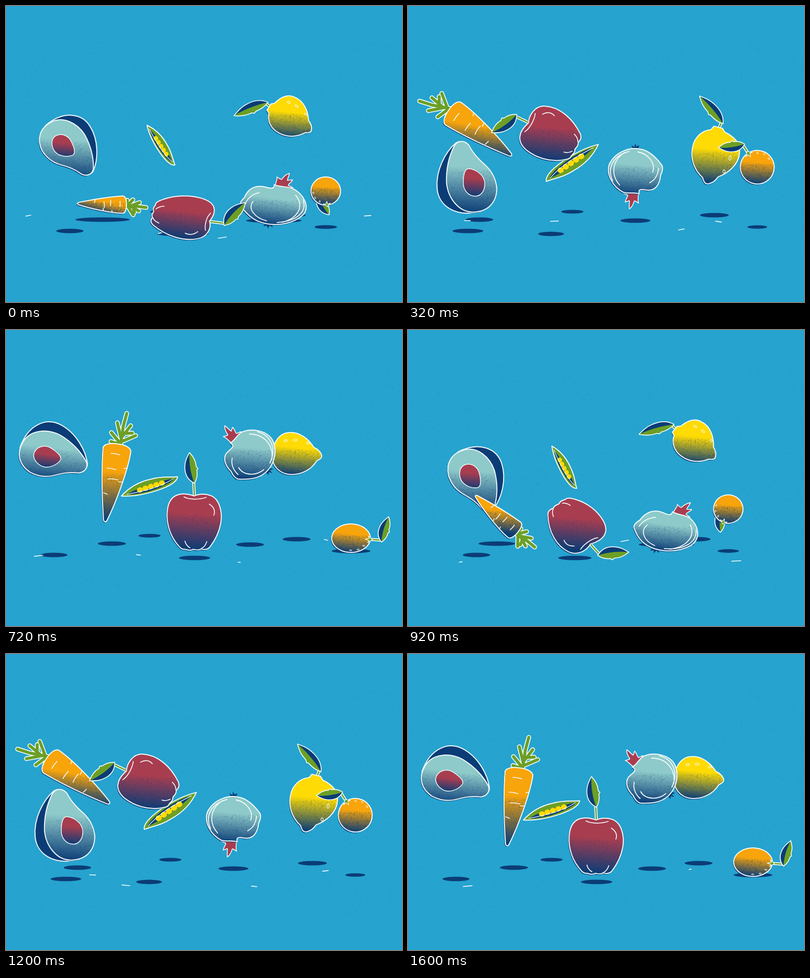
Write an HTML page with a canvas that moves like this. It is 800 by 600 pixels and loops after 1640 ms.

```html
<!DOCTYPE html>
<html lang="en">
<head>
<meta charset="utf-8">
<title>Bouncing produce</title>
<style>
html, body { margin: 0; width: 100%; height: 100%; overflow: hidden; background: #26a3cf; }
canvas { display: block; width: 800px; height: 600px; }
</style>
</head>
<body>
<canvas id="stage" width="800" height="600"></canvas>
<script>
const ctx = document.getElementById('stage').getContext('2d');
const LOOP = 1640, STEP = 40, CYCLE = 880, TIMES = [0, 200, 480, 720];
const NAVY = '#0b3c76', WHITE = '#f4fbfb', GREEN = '#6c9f25', RED = '#a93d50',
      TEAL = '#8ecaca', YELLOW = '#fedb04', ORANGE = '#f8a40b', BLUE = '#26a3cf';

function random(seed) {
  return () => (seed = (seed * 16807) % 2147483647) / 2147483647;
}

const oval = (x, y, a, b) => `M${x - a} ${y}a${a} ${b} 0 1 1 ${2 * a} 0a${a} ${b} 0 1 1 ${-2 * a} 0Z`;

function peas() {
  let d = '';
  for (let i = 0; i < 5; i++) d += oval(334 + i * 13, 407 - i * 2.2, 7, 6);
  return d;
}

const POD = 'M290 415C310 398 335 388 362 386C388 382 405 388 424 389C421 401 402 408 377 413C345 419 315 420 290 415Z';
const LEAF = 'M-5 1C6 -14 20 -16 34 -13C46 -11 54 -4 62 2C50 10 38 12 30 11L25 14L22 11C12 11 3 8 -5 1Z';
const LEAF_LOW = 'M-5 1C12 -3 38 -4 62 2C50 10 38 12 30 11L25 14L22 11C12 11 3 8 -5 1Z';

// keys: x, y, angle, size, bend at each of TIMES; hit: the key on the ground.
const items = [
  { // pea pod
    at: [357, 402], ground: 417, shadow: 43, hit: 2,
    keys: [[313, 282, 66, .72], [320, 284, 72, .88], [357, 402, 360], [290, 317, 352, .88]],
    parts: [
      { d: POD, fill: GREEN },
      { d: 'M303 413C327 403 345 402 365 398C388 393 403 392 416 392C405 402 382 408 354 413C334 415 316 416 303 413Z', fill: NAVY },
      { d: peas(), fill: YELLOW },
      { d: POD, line: 2 },
      { d: 'M303 413C335 411 375 410 414 392', line: 1.3 }
    ]
  },
  { // lemon
    at: [587, 251], half: [48, 43], ground: 424, shadow: 56, soft: .17, hit: 2,
    keys: [[577, 227, 29, .93], [622, 262, 60, 1.1], [580, 391, 180, 1.04], [587, 251, 360]],
    stem: { from: [538, 253], joint: [521, 250], turn: -230, size: 1.1, flip: -.75 },
    parts: [
      { d: 'M637 252C640 259 634 262 628 265C618 281 600 293 578 293C556 293 543 280 539 266L532 262L533 246L539 241C545 220 556 209 571 208C593 205 612 222 622 238C629 241 634 245 637 252Z', fill: YELLOW, lit: true, line: 2 },
      { d: oval(565, 224, 3.5, 2) + oval(584, 223, 4, 2) + oval(610, 229, 3, 2), line: 1.1 }
    ]
  },
  { // onion
    at: [493, 253], half: [50, 50], ground: 435, shadow: 56, soft: .18, hit: 0,
    keys: [[541, 402, 60, 1.04], [470, 394, 140], [468, 252, 343], [493, 253, 360]],
    parts: [
      { d: 'M518 282C526 279 533 279 540 282L533 284L538 290L531 288L530 294L526 289L522 293Z', fill: NAVY },
      { d: 'M455 228C448 224 446 218 439 216C446 214 448 214 448 212C444 206 441 200 442 194C448 198 452 204 455 205L458 197C464 204 462 208 466 210L474 206C475 214 474 222 466 226Z', fill: RED, line: 1.6 },
      { d: 'M453 229C462 225 466 213 476 207C498 198 528 204 539 224C550 250 540 282 514 296C498 304 480 303 468 302C461 299 458 294 455 287C440 272 437 256 450 245C459 238 462 234 453 229Z', fill: TEAL, lit: true, line: 2 },
      { d: 'M492 211C523 211 541 235 537 262M508 206C536 214 547 240 533 270M470 279C480 296 505 296 521 283M457 260C454 274 461 286 469 293', line: 1.8 }
    ]
  },
  { // avocado
    at: [79, 296], half: [69, 48], ground: 456, shadow: 54, hit: 1,
    keys: [[129, 288, 58, .95], [181, 397, 152, 1.12], [79, 296, 360], [97, 254, 388]],
    parts: [
      { d: 'M11 315C3 264 30 235 62 235C98 235 132 258 147 280C152 290 147 300 120 302Z', fill: NAVY, line: 2 },
      { d: 'M11 300C13 272 42 254 72 254C104 256 128 267 143 277C152 285 150 297 140 304C122 311 110 321 97 333C84 344 68 349 52 349C25 346 9 328 11 300Z', fill: TEAL, lit: true, line: 2 },
      { d: 'M41 308C42 292 56 285 68 286C82 287 96 291 95 299C93 312 80 328 64 327C50 326 41 318 41 308Z', fill: RED, lit: true, box: [68, 306, 27, 20], line: 1.5 }
    ]
  },
  { // carrot
    at: [214, 308], half: [27, 78], ground: 433, shadow: 55, hit: 0,
    keys: [[195, 402, 82, .62], [142, 291, 247, .95, -27], [170, 245, 328, .94, -10], [214, 308, 360]],
    parts: [
      { d: 'M231 236L237 195L244 169M231 230L213 208M233 222L225 188M235 216L252 194M234 226L262 214M231 232L212 226M238 210L255 209', tube: 6, hinge: [230, 234] },
      { d: 'M196 238C199 230 213 229 226 231C238 232 254 238 252 248C246 285 222 350 205 384C202 391 198 390 197 384C194 340 192 290 196 238Z', fill: ORANGE, lit: true, line: 2 },
      { d: 'M212 250Q221 250 230 253M204 280Q213 280 222 283M238 281L245 280M206 302Q216 301 226 304M227 308L235 308M197 330L205 333', line: 1.6 }
    ]
  },
  { // apple
    at: [381, 388], half: [53, 58], ground: 462, shadow: 52, soft: .12, hit: 0,
    keys: [[357, 428, 102, .93], [288, 300, 264, .97], [320, 260, 312, .97, -5], [381, 388, 360, 1, 50]],
    stem: { from: [381, 340], joint: [379, 304], turn: -150, size: .94, flip: 1 },
    parts: [
      { d: 'M380 335C395 328 418 330 427 348C440 375 433 410 412 440C406 448 398 447 394 445C388 450 382 446 378 446C371 451 366 446 362 446C355 447 351 441 345 433C330 412 324 385 328 360C333 333 352 325 380 335Z', fill: RED, lit: true, line: 2 },
      { d: 'M360 337C370 343 391 343 404 338M410 352C419 358 422 366 419 375M362 429Q364 438 372 443M395 444Q402 440 405 430', line: 1.7 }
    ]
  },
  { // orange
    at: [0, 0], half: [34, 34], ground: 448, shadow: 39, soft: .15, hit: 3,
    keys: [[646, 375, 85, .86, -125], [687, 322, 215, .97], [718, 359, 252, 1.02], [697, 422, 365]],
    stem: { from: [31, 0], joint: [54, 0], turn: -80, size: .8, flip: 1 },
    parts: [
      { d: oval(0, 0, 34, 34), fill: ORANGE, lit: true, line: 2 },
      { d: oval(15, 26, 2, 1.4) + oval(2, 29, 2, 1.4) + oval(24, 16, 2, 1.4), line: 1 },
      { d: 'M38 0L30 -8L32 -2L25 0L32 3L30 8Z', fill: GREEN, line: 1.2 }
    ]
  }
];

const cache = new Map();
function place(d, m) {
  if (!cache.has(d)) cache.set(d, new Path2D(d));
  const p = new Path2D();
  p.addPath(cache.get(d), m);
  return p;
}

// Smooth curve through uneven keys, with free ends.
function curve(t, v, x) {
  const last = t.length - 1;
  const h = i => t[i + 1] - t[i], d = i => (v[i + 1] - v[i]) / h(i);
  const slope = i => {
    if (i === 0) return d(0) + (d(0) - d(1)) * h(0) / (h(0) + h(1));
    if (i === last) return d(i - 1) + (d(i - 1) - d(i - 2)) * h(i - 1) / (h(i - 1) + h(i - 2));
    return (d(i - 1) * h(i) + d(i) * h(i - 1)) / (h(i - 1) + h(i));
  };
  let i = 0;
  while (i < last - 1 && x >= t[i + 1]) i++;
  const u = (x - t[i]) / h(i), w = 1 - u;
  return v[i] * w * w * (1 + 2 * u) + v[i + 1] * u * u * (3 - 2 * u)
    + h(i) * u * w * (slope(i) * w - slope(i + 1) * u);
}

// From one hit to the next: a flight with one full turn.
function pose(item, phase) {
  const times = [], keys = [];
  for (let i = item.hit; i <= item.hit + TIMES.length; i++) {
    const lap = Math.floor(i / TIMES.length), j = i % TIMES.length;
    const [x, y, angle, size = 1, bend = 0] = item.keys[j];
    times.push(TIMES[j] + lap * CYCLE);
    keys.push([x, y, angle + lap * 360, size, bend]);
  }
  const t = phase < times[0] ? phase + CYCLE : phase;
  const [x, y, angle, size, bend] = keys[0].map((_, i) => curve(times, keys.map(k => k[i]), t));
  const press = Math.exp(-Math.max(0, keys[0][1] - y) / 26), soft = (item.soft || 0) * press;
  const kx = size * (1 + soft), ky = size * (1 - soft);
  const m = new DOMMatrix().translate(x, y).scale(kx, ky).rotate(angle).translate(-item.at[0], -item.at[1]);
  return { m, x, angle, kx, ky, bend, press };
}

const grainRnd = random(4271);
const grain = Array.from({ length: 800 }, () => [grainRnd() * 2 - 1, 1 - 1.2 * grainRnd() ** 1.3]);

// Light comes from above, whatever the turn of the item.
function shade(shape, part, item, { m, angle, kx, ky }) {
  const [cx, cy, w, h] = part.box || [...item.at, ...item.half];
  const c = m.transformPoint(new DOMPoint(cx, cy));
  const a = angle * Math.PI / 180, co = Math.cos(a), si = Math.sin(a);
  const rx = kx * Math.hypot(w * co, h * si), ry = ky * Math.hypot(w * si, h * co);
  const g = ctx.createLinearGradient(c.x + rx * .1, c.y - ry, c.x - rx * .1, c.y + ry);
  g.addColorStop(.36, part.fill);
  g.addColorStop(1, NAVY);
  ctx.fillStyle = g;
  ctx.fill(shape);
  if (part.box) return;
  ctx.save();
  ctx.clip(shape);
  ctx.fillStyle = 'rgba(11,60,118,.4)';
  for (const [u, v] of grain) ctx.fillRect(c.x + u * rx * 1.2, c.y + v * ry, 1, 1);
  ctx.restore();
}

function stroke(shape, width, color = WHITE) {
  ctx.lineWidth = width;
  ctx.strokeStyle = color;
  ctx.stroke(shape);
}

function tube(shape, width) {
  stroke(shape, width + 3.4);
  stroke(shape, width, GREEN);
}

function drawStem({ from, joint, turn, size, flip }, { m, angle, bend }) {
  const a = m.transformPoint(new DOMPoint(...from)), b = m.transformPoint(new DOMPoint(...joint));
  tube(new Path2D(`M${a.x} ${a.y}L${b.x} ${b.y}`), 2.6);
  const leaf = new DOMMatrix().translate(b.x, b.y).rotate(angle + turn + bend).scale(size, size * flip);
  ctx.fillStyle = NAVY;
  ctx.fill(place(LEAF, leaf));
  ctx.fillStyle = GREEN;
  ctx.fill(place(LEAF_LOW, leaf));
  stroke(place(LEAF, leaf), 1.7);
}

function drawPart(part, item, pos) {
  let m = pos.m;
  if (part.hinge) {
    const [x, y] = part.hinge;
    m = m.translate(x, y).rotate(pos.bend).translate(-x, -y);
  }
  const shape = place(part.d, m);
  if (part.tube) tube(shape, part.tube);
  if (part.lit && !part.box) {
    ctx.fillStyle = NAVY;
    ctx.fill(place(part.d, new DOMMatrix().translate(-1.5, 2).multiply(m)));
  }
  if (part.lit) {
    shade(shape, part, item, pos);
  } else if (part.fill) {
    ctx.fillStyle = part.fill;
    ctx.fill(shape);
  }
  if (part.line) stroke(shape, part.line);
}

function drawShadow(item, { x, press }) {
  const r = item.shadow * (.5 + .5 * press);
  ctx.fillStyle = NAVY;
  ctx.beginPath();
  ctx.ellipse(x, item.ground, r, Math.min(4.5, r * .17), 0, 0, 7);
  ctx.fill();
}

// Short white flicks along the ground, new at each step.
function drawFlicks(n) {
  const rnd = random(n * 7919 + 31);
  let d = '';
  for (let x = 40; x < 760; x += 190) {
    d += `M${x + rnd() * 150} ${422 + rnd() * 50}l${4 + rnd() * 14} ${rnd() * 5 - 3}`;
  }
  stroke(new Path2D(d), 1.7);
}

const backdrop = document.createElement('canvas');
backdrop.width = 800;
backdrop.height = 600;
{
  const b = backdrop.getContext('2d'), rnd = random(977);
  b.fillStyle = BLUE;
  b.fillRect(0, 0, 800, 600);
  b.fillStyle = 'rgba(16,120,176,.16)';
  for (let i = 0; i < 9000; i++) b.fillRect(rnd() * 800, 74 + rnd() * 454, 1.2, 1.2);
}

function draw(n) {
  const poses = items.map(item => pose(item, n * STEP % CYCLE));
  ctx.drawImage(backdrop, 0, 0);
  ctx.lineCap = ctx.lineJoin = 'round';
  items.forEach((item, i) => drawShadow(item, poses[i]));
  drawFlicks(n);
  items.forEach((item, i) => {
    if (item.stem) drawStem(item.stem, poses[i]);
    for (const part of item.parts) drawPart(part, item, poses[i]);
  });
}

const start = performance.now();
let shown = -1;
function tick() {
  const n = Math.floor((performance.now() - start) % LOOP / STEP);
  if (n !== shown) draw(shown = n);
  requestAnimationFrame(tick);
}
tick();
</script>
</body>
</html>
```
